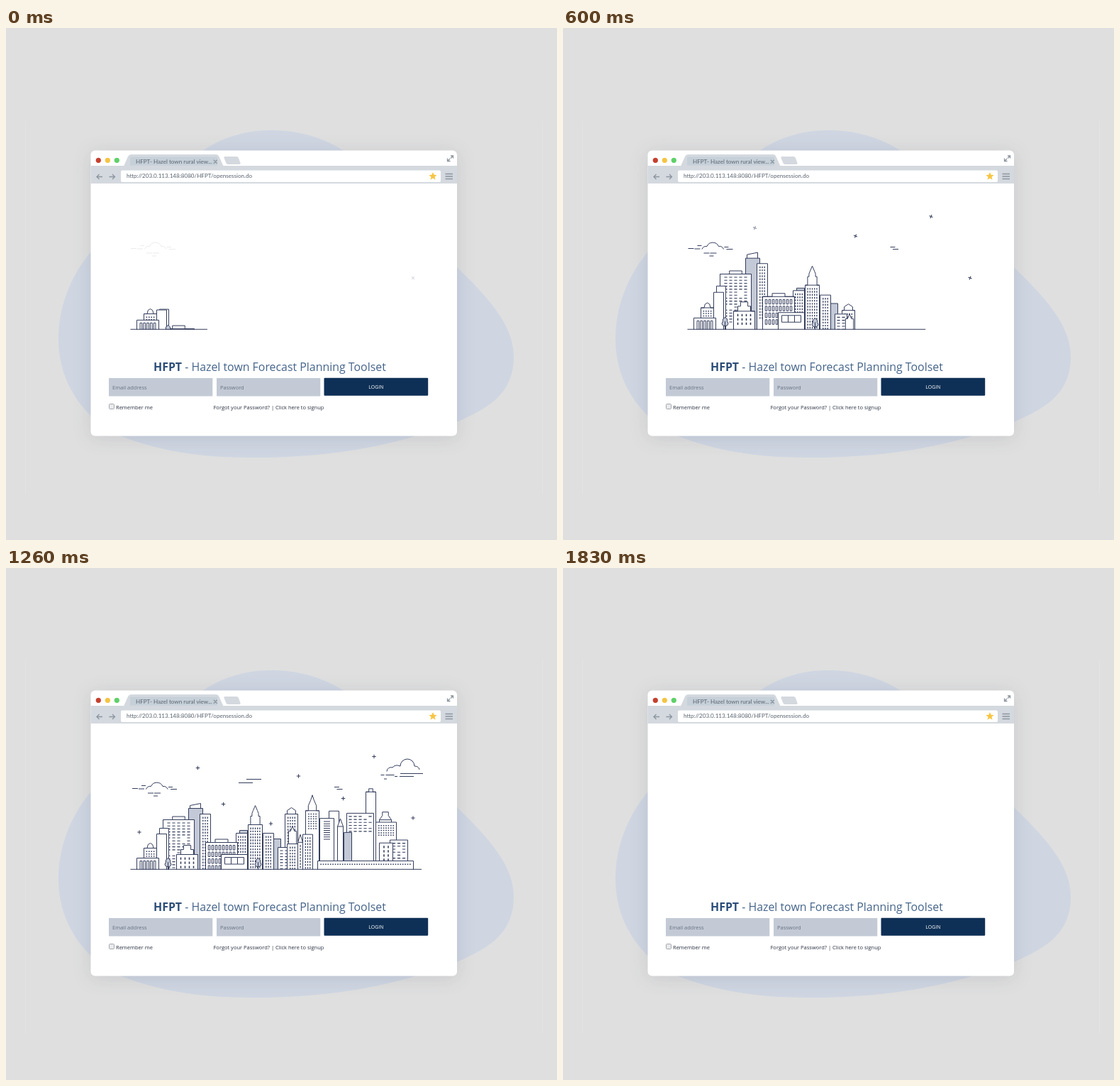
Recreate the animation shown at these times as an HTML page. Size 777 by 721 pixels, loop 1850 ms.

```html
<!DOCTYPE html>
<html lang="en">
<head>
<meta charset="utf-8">
<title>City login</title>
<style>
  html, body { margin: 0; width: 100%; height: 100%; overflow: hidden; background: #dfdfdf; }
  svg { display: block; position: absolute; left: 0; top: 0; }
  .shadow { filter: drop-shadow(0 3px 13px rgba(40, 50, 70, .12)); }
  .bar { font: 8.1px Lato, sans-serif; fill: #59636e; }
  .form { font: 7.5px "Open Sans", sans-serif; fill: #2b3342; }
  .hint { fill: #687080; }
  .head { font: 15.9px "Open Sans", sans-serif; fill: #45648a; }
  .head .bold { font-weight: 700; fill: #2c4d78; }
  .chrome { fill: none; stroke: #8c959f; stroke-width: 1.3; }
  .ink, .wall, .grey { stroke: #343d5c; stroke-width: 1; fill: none; }
  .wall { fill: #fff; }
  .grey { fill: #c3c9d6; }
  .win { fill: #343d5c; }
</style>
</head>
<body>
<svg width="777" height="721" viewBox="0 0 777 721">
  <defs><clipPath id="ground"><rect x="120" y="220" width="516" height="204.8"/></clipPath></defs>
  <path d="M27.5 130V655M756.5 130V655" stroke="#e3e3e3"/>
  <path fill="#cfd6e2" d="M375 144C430 144 470 165 500 190C560 240 598 300 637 338C680 380 716 418 716 463C716 515 680 535 640 553C560 585 470 605 345 605C270 605 215 595 160 574C110 550 74 500 74 438C74 390 93 347 119 316C170 260 180 220 280 171C310 152 340 144 375 144Z"/>
  <rect class="shadow" x="119.5" y="172.5" width="516.5" height="402" rx="6" fill="#fff"/>

  <!-- browser bar -->
  <path fill="#d4d9df" d="M119.5 194H636V219H119.5ZM166 194.5L172 181Q173.5 178 177 178H296Q299 178 300.5 181L306.5 194.5ZM309 181H325Q327 181 328 183L330.5 190Q331 192 329 192H313Q311 192 310.3 190L307.5 183Q307 181 309 181Z"/>
  <path fill="#c6d0d9" d="M175 181.5H298V193.5H175Z"/>
  <circle cx="130.3" cy="186.3" r="3.6" fill="#c5402f"/>
  <circle cx="143.3" cy="186.3" r="3.6" fill="#f5c443"/>
  <circle cx="156.3" cy="186.3" r="3.6" fill="#5fd069"/>
  <text class="bar" x="183" y="190.5">HFPT- Hazel town rural view...</text>
  <path class="chrome" d="M292.8 185.8l5 5m0-5l-5 5M622.5 183.5v4h4m-4 0l3.5-3.500M627 180h3.5v3.500m0-3.500L627 183.500M136 209.500h-7.500m3-3.500l-3.500 3.500l3.500 3.500M145.500 209.500h7.500m-3-3.500l3.500 3.500l-3.500 3.500M619.500 205.500h10.500m-10.500 3.500h10.500m-10.500 3.500h10.500"/>
  <rect x="162" y="200.5" width="451" height="16.5" rx="2" fill="#fff"/>
  <text class="bar" x="170" y="211.3">http://203.0.113.148:8080/HFPT/opensession.do</text>
  <path fill="#f6c544" d="M602 203l1.600 3.800l4 .3l-3.100 2.600l1 4l-3.500-2.200l-3.500 2.200l1-4l-3.100-2.600l4-.3z"/>

  <!-- login form -->
  <text class="head" x="208" y="483"><tspan class="bold">HFPT</tspan> - Hazel town Forecast Planning Toolset</text>
  <path fill="#c3cad6" d="M145 493H291.3V518.5H145ZM297 493H443.3V518.5H297Z"/>
  <rect x="448.5" y="492.7" width="146.7" height="25" rx="1" fill="#0f3056"/>
  <text class="form hint" x="150" y="508.8">Email address</text>
  <text class="form hint" x="302" y="508.8">Password</text>
  <text class="form" x="522" y="508.3" text-anchor="middle" style="fill:#fff;font-size:7px">LOGIN</text>
  <rect x="145.500" y="529.500" width="7" height="7" rx="1" fill="#e9eaec" stroke="#a3a7ad"/>
  <text class="form" x="155" y="537.2">Remember me</text>
  <text class="form" x="292.500" y="537.2">Forgot your Password? | Click here to signup</text>

  <g id="scene">
    <g id="sky"></g>
    <g id="city" clip-path="url(#ground)"></g>
    <path id="base" class="ink"/>
  </g>
</svg>
<script>
const LOOP = 1850, HOLD = 130, STEP = 100 / 3, GROUND = 424, DEEP = 460, RISE = 680;
const $ = id => document.getElementById(id);
const clamp = v => Math.max(0, Math.min(1, v));

function add(parent, tag, attrs) {
  const el = document.createElementNS("http://www.w3.org/2000/svg", tag);
  for (const key in attrs) el.setAttribute(key, attrs[key]);
  parent.appendChild(el);
  return el;
}

let seed = 7;
const random = () => (seed = seed * 16807 % 2147483647) / 2147483647;

// Left half of each roof: [part of the width, height above the wall]
const ROOFS = {
  flat: [],
  cap: [[.3, 0], [.3, 4.5]],
  dome: [[.25, 0], [.32, 5], [.5, 7]],
  steps: [[.2, 0], [.2, 7], [.33, 7], [.33, 13]],
  crown: [[.17, 0], [.17, 12], [.27, 12], [.27, 16], [.35, 20], [.5, 27]],
  spire: [[.12, 0], [.12, 18], [.32, 18], [.5, 25]],
  peak: [[.17, 0], [.17, 5], [.5, 9]],
  needle: [[.2, 0], [.2, 7], [.38, 15], [.5, 22]],
  point: [[.5, 11]],
  lantern: [[.25, 6], [.25, 11]]
};

const WINDOWS = {
  slot: { dx: 3.2, dy: 4.2, w: 1.3, h: 2.4 },
  dash: { dx: 7, dy: 4.2, w: 4.2, h: 1.1, gaps: .12 },
  dot: { dx: 3.4, dy: 3.4, w: 1.6, h: 1.5 },
  pane: { dx: 6, dy: 6, w: 1.6, h: 3.2 },
  bar: { dx: 12, dy: 3.1, w: 9, h: 1 },
  arch: { dx: 5, dy: 9.5, w: 2.5, h: 6.5, hollow: true },
  column: { dx: 4.8, dy: 40, w: 2.7, h: 30, hollow: true },
  shop: { dx: 9, dy: 40, w: 9, h: 9.5, hollow: true }
};

// Fill a wall with centred windows down to the ground
function windows(x1, x2, top, { dx, dy, w, h, gaps = 0 }, rows = 99) {
  const cols = Math.floor((x2 - x1 - 2.5) / dx);
  const left = (x1 + x2 - (cols - 1) * dx - w) / 2;
  let d = "";
  for (let r = 0, y = top + 4; r < rows && y < GROUND; r++, y += dy)
    for (let c = 0; c < cols; c++)
      if (random() >= gaps) d += `M${left + c * dx} ${y}h${w}v${h}h${-w}z`;
  return d;
}

// The start sweeps from left to right, with a slight wave
const startAt = x => 2.95 * (x - 213) + 45 * clamp((x - 280) / 80) * Math.sin((x - 409) / 18);

const parts = [];
function grow(at, top, shapes) {
  const g = add($("city"), "g", {});
  for (const [cls, d] of shapes) add(g, "path", { class: cls, d });
  parts.push({ g, start: startAt(at), height: GROUND - top });
}

function tower(x1, x2, top, { roof = "flat", win, rows, skew = 0, cls = "wall", at = (x1 + x2) / 2 } = {}) {
  x1 += .5; x2 += .5; top += .5;
  const half = ROOFS[roof], w = x2 - x1;
  const left = half.map(([f, up]) => `L${x1 + f * w} ${top - up}`);
  const right = half.map(([f, up]) => `L${x2 - f * w} ${top - up}`).reverse();
  const shapes = [[cls, `M${x1} ${DEEP}V${top + skew}${left.join("")}${right.join("")}L${x2} ${top}V${DEEP}`]];
  if (half.length) shapes.push(["ink", `M${x1} ${top}H${x2}`]);
  if (win) shapes.push([WINDOWS[win].hollow ? "ink" : "win", windows(x1, x2, top, WINDOWS[win], rows)]);
  grow(at, top - Math.max(0, ...half.map(p => p[1])), shapes);
}

function tree(x, at = x) {
  grow(at, 408, [
    ["grey", `M${x - 2} 410q2-3 4 0q2 2 1 4q3 4 0 6q-3 2-6 0q-3-2 0-6q-1-2 1-4z`],
    ["ink", `M${x} 414V${DEEP}`]
  ]);
}

// Left block
tower(259, 274, 331, { skew: 3 });
tower(257, 277, 338, { cls: "grey" });
tower(273, 288, 346, { win: "slot" });
tower(221, 265, 354, { roof: "cap", win: "dash" });
tower(240, 270, 403, { roof: "steps", win: "pane" });
tower(216, 229, 366);
tower(212, 226, 374, { win: "bar" });
tower(194, 212, 394, { roof: "dome", win: "dot" });
tower(184, 215, 408, { win: "column", at: 200 });
tree(228.5);

// Centre block
tower(329, 340, 369, { cls: "grey" });
tower(324, 340, 373, { win: "slot" });
tower(341, 361, 361, { roof: "crown", win: "slot" });
tower(281, 326, 386, { roof: "cap", win: "arch" });
tower(362, 377, 373, { win: "slot" });
tower(303, 340, 403, { win: "shop" });
tree(355.5);
tower(377, 387, 381, { cls: "grey" });
tower(393, 411, 346, { roof: "peak", win: "slot" });
tower(383, 400, 393, { win: "dash" });
tower(396, 411, 388, { roof: "spire", win: "slot" });
tower(422, 441, 346, { roof: "needle", win: "dot", rows: 7 });
tower(411, 418, 386, { roof: "point", win: "slot" });
tower(418, 432, 376, { win: "slot" });

// Right block
tower(455, 469, 349);
tower(442, 462, 358, { win: "bar", rows: 9 });
tower(507, 521, 333, { roof: "cap", win: "bar" });
tower(480, 518, 355, { win: "dash", rows: 6 });
tower(467, 475, 370, { roof: "point" });
tower(476, 487, 377, { cls: "grey" });
tower(526, 543, 366, { roof: "lantern" });
tower(521, 550, 367, { win: "dot", rows: 5 });
tower(541, 566, 385, { win: "dash" });
tower(545, 572, 405, { at: 625 });
tower(526, 545, 392, { win: "pane" });
tower(439, 574, 413, { win: "dot", rows: 1, at: 465 });
tree(580.5, 643);

// Sky
const CLOUD = "M0 0a6 6 0 0 1 7-4a9 9 0 0 1 16.500 0a6 6 0 0 1 7 4";
const BIG_CLOUD = "M537 286.500a6 6 0 0 1 8-5.500q4-5 11-2a10 10 0 0 1 20 0q6 0 7 5";
const drifters = [
  ["M178 310.500h8m1 .5h8M191 306.500h6M229 308.500h6m-3 3h9M200 317h8m1 0h9M208 321h6" + CLOUD.replace("M0 0", "M197.500 311.500"), 50, 500],
  ["M463 308.500h7m-3.500 3h8", 150, 300],
  ["M339 297.500h21M328 302.500h20", 650, 500],
  ["M556 289.500h32M528.500 291.500h5m2 0h12M555 293.500h20m-27 0h4M533 297h4" + BIG_CLOUD, 600, 600]
].map(([d, start, span]) => ({ start, span, el: add($("sky"), "path", { class: "ink", d }) }));

const stars = [[574, 352], [519, 265.5], [412.5, 293], [270.5, 281.5], [188, 372], [306.5, 332.5], [373.5, 360], [475.5, 324.5]]
  .map(([x, y], i) => ({ x, y, start: 50 + 140 * i, el: add($("sky"), "path", { class: "ink", d: "M-2.700 0h5.400M0-2.700v5.400" }) }));

// Ease out with a 20 % overshoot
function backOut(x) {
  const u = 1 - clamp(x);
  return 1 - 3.6 * u ** 3 + 2.6 * u * u;
}

function draw(t) {
  for (const { g, start, height } of parts) {
    const x = (t - start) / RISE;
    g.style.display = x > 0 ? "" : "none";
    g.setAttribute("transform", `translate(0 ${height * (1 - backOut(x))})`);
  }
  const out = clamp((t - 1270) / 330);
  const drift = 2 * clamp((t - 400) / 860) - 2 + 12 * out * out * (3 - 2 * out);
  for (const { el, start, span } of drifters) {
    el.setAttribute("opacity", clamp((t - start) / span));
    el.setAttribute("transform", `translate(${drift} 0)`);
  }
  const turn = 45 * (1 - clamp(t / 1200)) + 35 * out;
  for (const { el, x, y, start } of stars) {
    el.setAttribute("opacity", clamp((t - start) / 220));
    el.setAttribute("transform", `translate(${x} ${y}) rotate(${turn})`);
  }
  $("base").setAttribute("d", `M175.500 424.300H${Math.min(586, 240 + t / 2.2)}`);
  $("scene").setAttribute("opacity", clamp(1 - (t - 1430) / 390));
}

function tick() {
  const t = performance.now() % LOOP;
  const n = t < HOLD ? -1 : Math.floor((t - HOLD + 5) / STEP);
  draw(HOLD + n * STEP);
  requestAnimationFrame(tick);
}
tick();
</script>
</body>
</html>
```
